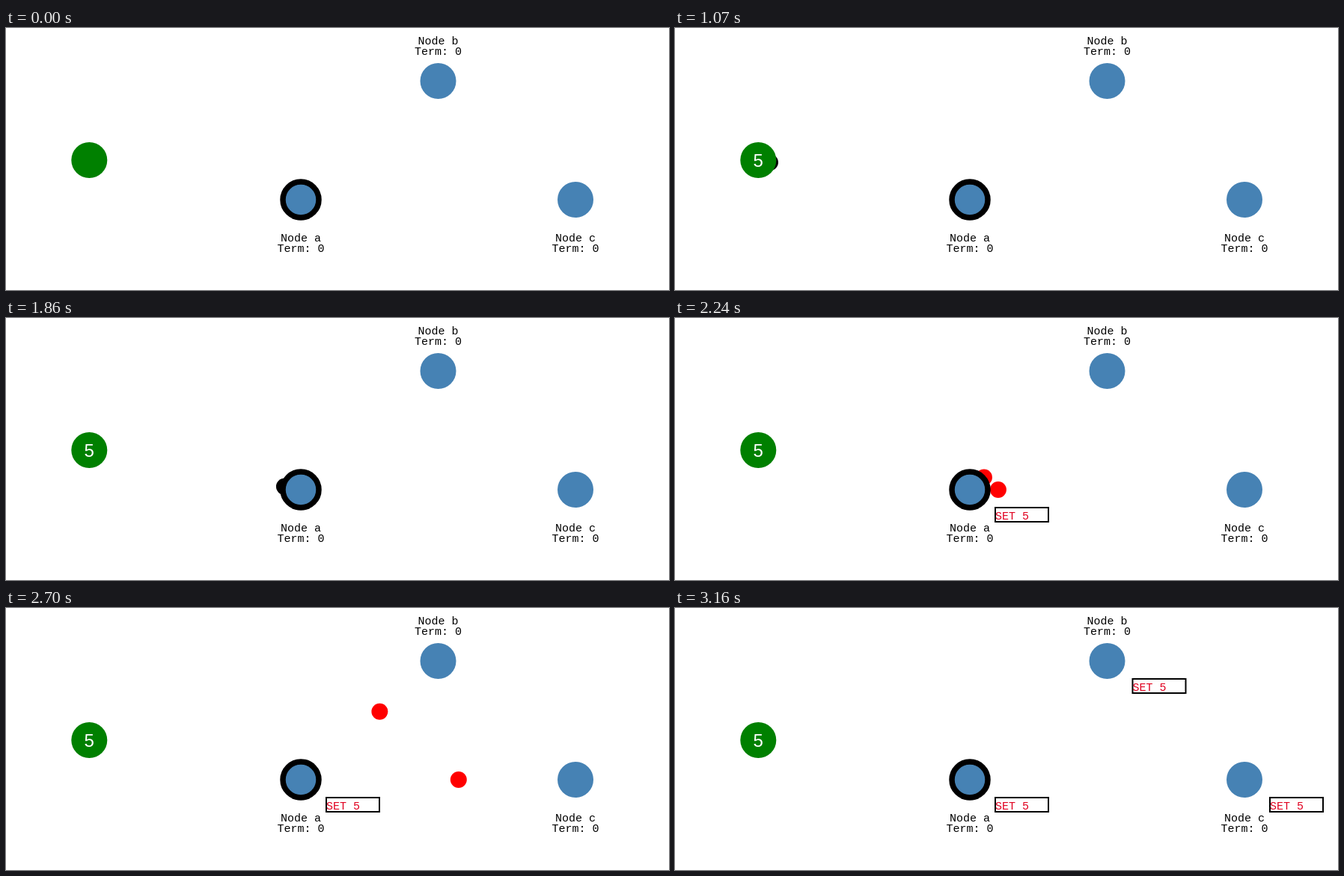
These frames come from a looping animation (886x351 px, 3880 ms). An HTML page:

```html
<!DOCTYPE html>
<html lang="en">
<head>
<meta charset="utf-8">
<title>Log replication</title>
<style>
  html, body { margin: 0; width: 100%; height: 100%; overflow: hidden; background: #fff; }
  svg { display: block; width: 886px; height: 351px; }
  .label, .entry text { font: 15px "Courier New", "Liberation Mono", monospace; white-space: pre; }
  .label { text-anchor: middle; }
  .entry rect { fill: #fff; stroke: #000; stroke-width: 2; }
  .entry text { fill: #e00020; }
  .value { font: 24px Arial, "Liberation Sans", sans-serif; fill: #fff; text-anchor: middle; }
</style>
</head>
<body>
<svg id="stage" viewBox="0 0 886 351"></svg>
<script>
const LOOP = 3880;
const STEP = 77; // ms between two moves of a dot
const R = 24;
const client = { x: 111.3, y: 177 };
const nodes = {
  a: { x: 394, y: 230, labelY: 56, logAt: 2010, leader: true },
  b: { x: 577.5, y: 71, labelY: -49, logAt: 3160 },
  c: { x: 761, y: 230, labelY: 56, logAt: 3160 }
};

// Key points of a trip: [step, share of the path covered]
const request = [[13.4, 0], [20, 0.61], [25, 1]];
const replicate = [[27.7, 0], [33, 0.421], [40.55, 1]];

const stage = document.getElementById("stage");

function add(tag, attrs, text, parent = stage) {
  const el = document.createElementNS("http://www.w3.org/2000/svg", tag);
  for (const key in attrs) el.setAttribute(key, attrs[key]);
  if (text) el.textContent = text;
  parent.append(el);
  return el;
}

function addDot(from, to, keys, fill) {
  return { from, to, keys, el: add("circle", { r: 11, fill }) };
}

function addNode(name, node) {
  const { x, y, labelY, leader } = node;
  add("circle", {
    cx: x, cy: y, r: R, fill: "steelblue",
    stroke: leader ? "#000" : "none", "stroke-width": 7.5
  });
  node.log = add("g", { class: "entry", transform: `translate(${x + 34} ${y + R})` });
  add("rect", { width: 71, height: 19 }, "", node.log);
  add("text", { y: 16 }, "SET 5", node.log);
  add("text", { class: "label", x, y: y + labelY }, "Node " + name);
  add("text", { class: "label", x, y: y + labelY + 14 }, "Term: 0");
}

const dots = [
  addDot(client, nodes.a, request, "#000"),
  addDot(nodes.a, nodes.b, replicate, "red"),
  addDot(nodes.a, nodes.c, replicate, "red")
];
add("circle", { cx: client.x, cy: client.y, r: R, fill: "green" });
const value = add("text", { class: "value", x: client.x, y: client.y + 9 }, "5");
for (const name in nodes) addNode(name, nodes[name]);

const lerp = (a, b, p) => a + (b - a) * p;

function progress([start, mid, end], step) {
  const [k0, k1] = step < mid[0] ? [start, mid] : [mid, end];
  const p = lerp(k0[1], k1[1], (step - k0[0]) / (k1[0] - k0[0]));
  return Math.min(1, Math.max(0, p));
}

function show(el, on) {
  el.setAttribute("visibility", on ? "visible" : "hidden");
}

function draw(t) {
  const step = Math.floor(t / STEP + 0.14);
  for (const { from, to, keys, el } of dots) {
    const p = progress(keys, step);
    el.setAttribute("cx", lerp(from.x, to.x, p));
    el.setAttribute("cy", lerp(from.y, to.y, p));
    show(el, p > 0 && p < 1);
  }
  show(value, t >= 540);
  for (const node of Object.values(nodes)) show(node.log, t >= node.logAt);
}

const start = performance.now();
function frame() {
  draw((performance.now() - start) % LOOP);
  requestAnimationFrame(frame);
}
frame();
</script>
</body>
</html>
```
